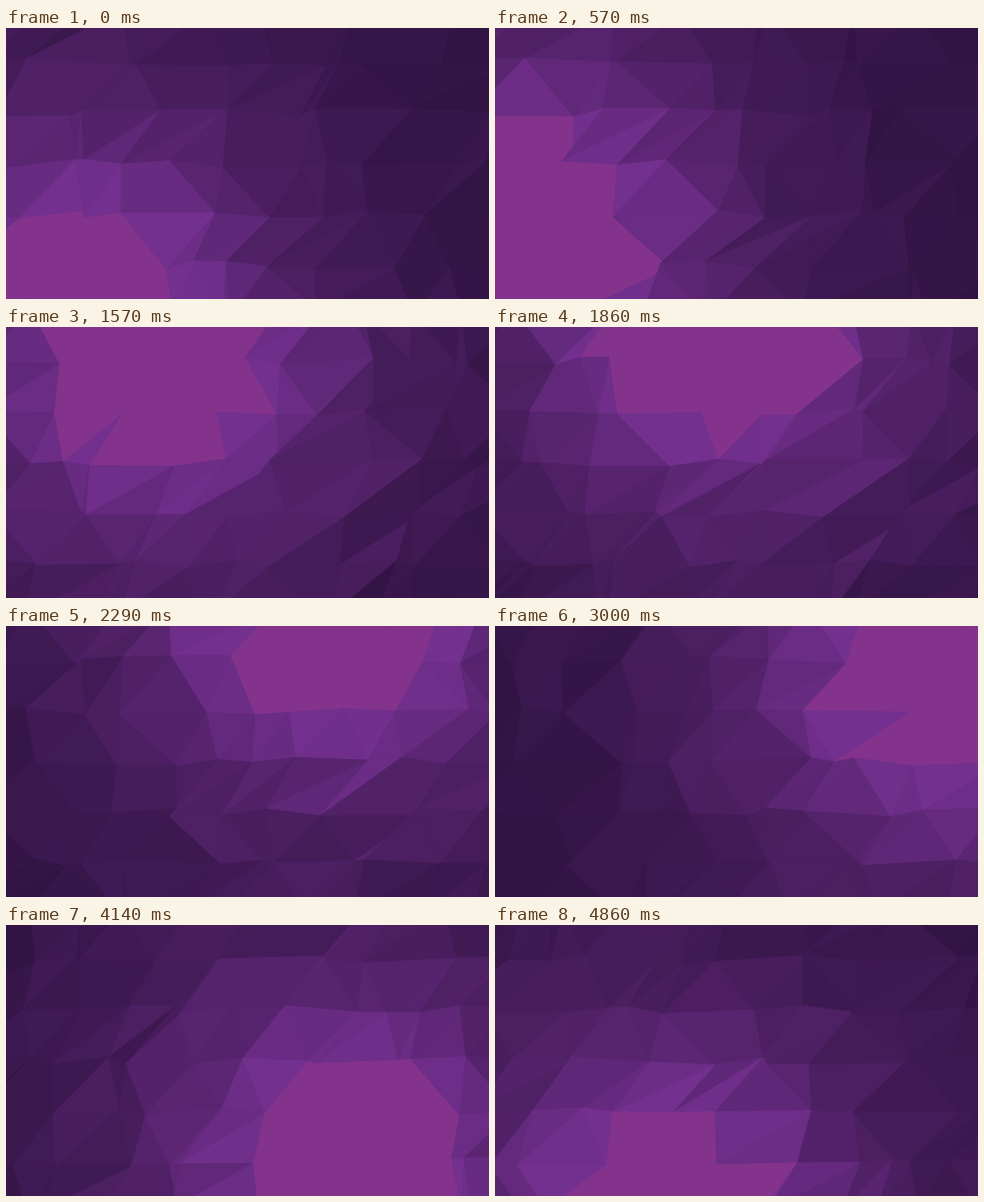
An HTML page with a canvas that plays this animation: 569x320 px, repeating every 5010 ms.

```html
<!DOCTYPE html>
<html lang="en">
<head>
<meta charset="utf-8">
<title>Low-poly light</title>
<style>
  html, body { margin: 0; width: 100%; height: 100%; overflow: hidden; background: #34174a; }
  canvas { display: block; }
</style>
</head>
<body>
<canvas width="569" height="320"></canvas>
<script>
const ctx = document.querySelector('canvas').getContext('2d');
const LOOP = 5010, STEP = 142.8, FRAMES = 35;
const COLS = 15, ROWS = 7, CELL_W = 56.9, CELL_H = 60;
const SWAY = 36, LIFT = 5, DEPTH = 1.1;
const LIGHT_Z = 80;

let seed = 48271;
const rnd = () => (seed = seed * 16807 % 2147483647) / 2147483647;

// A sine with its own random phase and speed.
function wave(size) {
  const phase = rnd() * 2 * Math.PI, speed = 0.4 + rnd() * 1.6;
  return t => size * Math.sin(phase + speed * t);
}

// grid[col][row] gives a corner's place at time t; it reaches past every edge.
const grid = Array.from({ length: COLS }, (_, c) =>
  Array.from({ length: ROWS }, (_, r) => {
    const dx = wave(SWAY), dy = wave(LIFT), dz = wave(DEPTH);
    return t => ({
      x: (c - 2) * CELL_W + dx(t),
      y: (r - 1) * CELL_H + 40 + dy(t),
      z: dz(t)
    });
  }));

// The light circles clockwise, a little further left at first.
const lightAt = t => ({
  x: 295 - 240 * Math.cos(1.23 * t - 0.855) - 55 * Math.exp(-2 * t),
  y: 165 + 180 * Math.cos(1.204 * t + 0.454)
});

function shade(a, b, c, light) {
  const ux = b.x - a.x, uy = b.y - a.y, uz = b.z - a.z;
  const vx = c.x - a.x, vy = c.y - a.y, vz = c.z - a.z;
  const nz = ux * vy - uy * vx;
  // Keep thin slivers from tilting too far.
  const len = Math.sign(nz || 1) * Math.max(Math.abs(nz), 2800);
  const nx = (uy * vz - uz * vy) / len, ny = (uz * vx - ux * vz) / len;
  const dx = light.x - (a.x + b.x + c.x) / 3;
  const dy = light.y - (a.y + b.y + c.y) / 3;
  const lit = (nx * dx + ny * dy + LIGHT_Z) / Math.hypot(dx, dy, LIGHT_Z);
  const glow = 37 + 212 * lit;
  if (glow > 150.5) return 'rgb(132,51,140)';
  const blue = Math.max(68, Math.min(glow, 143));
  return `rgb(${Math.round(blue * 0.87 - 9)},${Math.round(blue * 0.37 - 5)},${Math.round(blue)})`;
}

function triangle(a, b, c, light) {
  ctx.fillStyle = ctx.strokeStyle = shade(a, b, c, light);
  ctx.beginPath();
  ctx.moveTo(a.x, a.y);
  ctx.lineTo(b.x, b.y);
  ctx.lineTo(c.x, c.y);
  ctx.closePath();
  ctx.fill();
  ctx.stroke();
}

function draw(t) {
  const light = lightAt(t);
  const pts = grid.map(column => column.map(place => place(t)));
  for (let c = 0; c < COLS - 1; c++) {
    for (let r = 0; r < ROWS - 1; r++) {
      const upper = pts[c + 1][r], lower = pts[c][r + 1];
      triangle(pts[c][r], lower, upper, light);
      triangle(upper, lower, pts[c + 1][r + 1], light);
    }
  }
}

const start = performance.now();
let shown = -1;
function tick() {
  const ms = (performance.now() - start) % LOOP;
  const i = Math.min(FRAMES - 1, Math.floor((ms + 5) / STEP));
  if (i !== shown) draw((shown = i) * STEP / 1000);
  requestAnimationFrame(tick);
}
tick();
</script>
</body>
</html>
```
